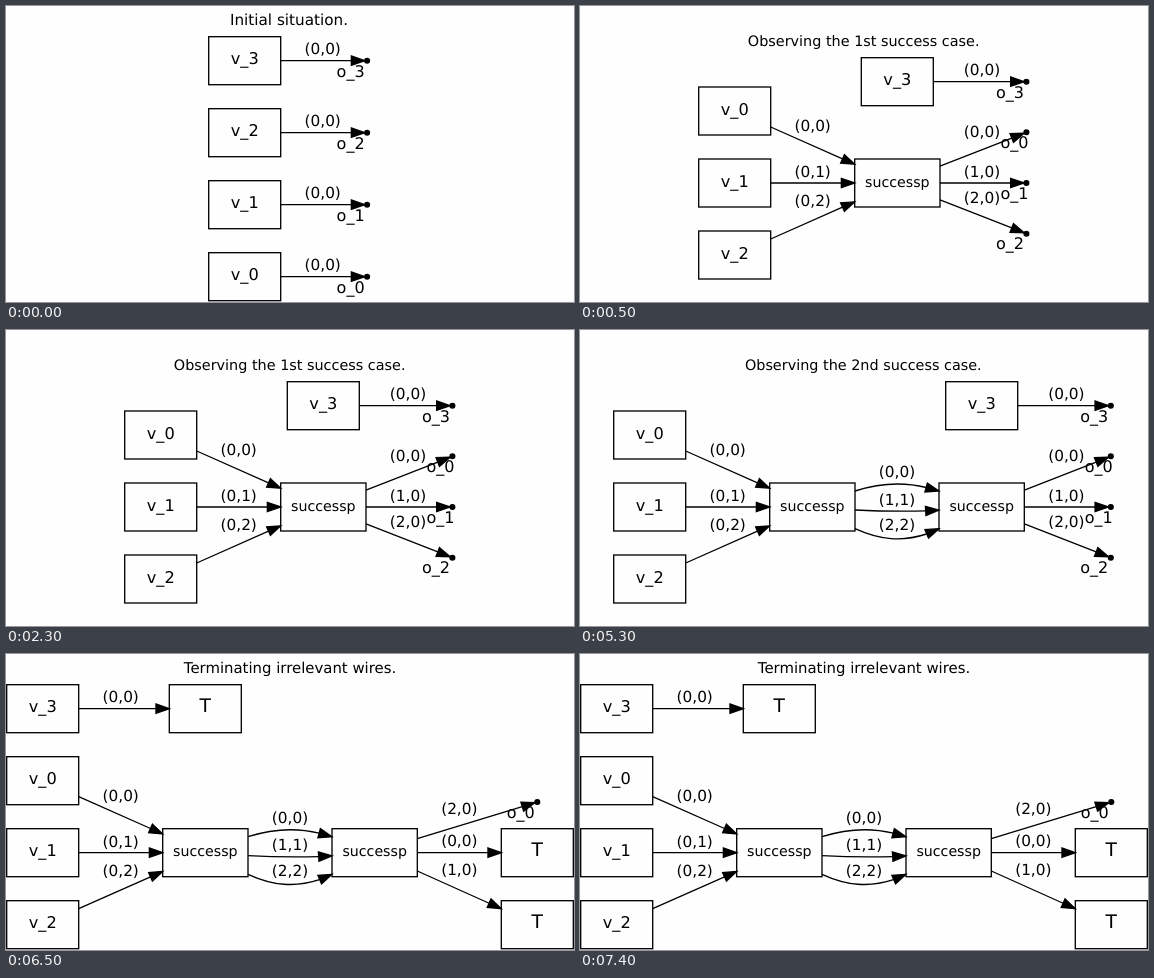
Animation of 568 by 296 pixels, one loop 8 s. Source, as an HTML page with a canvas:

```html
<!DOCTYPE html>
<html lang="en">
<head>
<meta charset="utf-8">
<style>
  html, body { margin: 0; width: 100%; height: 100%; overflow: hidden; background: #fefefe; }
  canvas { display: block; }
</style>
</head>
<body>
<canvas id="stage" width="568" height="296"></canvas>
<script>
const ctx = document.getElementById('stage').getContext('2d');
const BOX_W = 72, BOX_H = 48, PROC_W = 85.3, HEAD = 13.33;
const SIZE = { node: 16.2, process: 14.2, end: 18.67, wire: 15.3, output: 16 };

function text(str, x, y, size) {
  ctx.font = `${size}px "DejaVu Sans", sans-serif`;
  ctx.fillText(str, x, y);
}

function box(label, x, y, w = BOX_W, size = SIZE.node) {
  ctx.strokeRect(x, y, w, BOX_H);
  text(label, x + w / 2, y + 27.7, size);
}

const process = (x, y) => box('successp', x, y, PROC_W, SIZE.process);
const end = (x, y) => box('T', x, y, BOX_W, SIZE.end);
const wireLabel = (str, x, y) => text(str, x, y, SIZE.wire);

function head(x, y, angle) {
  ctx.save();
  ctx.translate(x, y);
  ctx.rotate(angle);
  ctx.beginPath();
  ctx.moveTo(0, 0);
  ctx.lineTo(-HEAD, -4.67);
  ctx.lineTo(-HEAD, 4.67);
  ctx.closePath();
  ctx.fill();
  ctx.stroke();
  ctx.restore();
}

function arrow(x1, y1, x2, y2) {
  const angle = Math.atan2(y2 - y1, x2 - x1);
  ctx.beginPath();
  ctx.moveTo(x1, y1);
  ctx.lineTo(x2 - HEAD * Math.cos(angle), y2 - HEAD * Math.sin(angle));
  ctx.stroke();
  head(x2, y2, angle);
}

function curve(x, y, c1, c2, base, tip) {
  ctx.beginPath();
  ctx.moveTo(x, y);
  ctx.bezierCurveTo(...c1, ...c2, ...base);
  ctx.stroke();
  head(...tip, Math.atan2(tip[1] - base[1], tip[0] - base[0]));
}

// Wire ending in a dot, with the output name placed relative to the dot.
function output(name, x1, y1, x2, y2, dx, dy) {
  const angle = Math.atan2(y2 - y1, x2 - x1);
  arrow(x1, y1, x2 - 2.4 * Math.cos(angle), y2 - 2.4 * Math.sin(angle));
  ctx.beginPath();
  ctx.arc(x2, y2, 2.4, 0, Math.PI * 2);
  ctx.fill();
  ctx.stroke();
  text(name, x2 + dx, y2 + dy, SIZE.output);
}

function at(x, y, draw) {
  ctx.save();
  ctx.translate(x, y);
  draw();
  ctx.restore();
}

function freeWire(i, x, y, length) {
  box('v_' + i, x, y);
  output('o_' + i, x + BOX_W, y + 24, x + BOX_W + length, y + 24, -16.5, 15.8);
}

// Three inputs feeding the first process; origin at the top input.
function inputs() {
  for (let i = 0; i < 3; i++) box('v_' + i, 0, i * 72);
  arrow(72, 40, 156, 77.2);
  arrow(72, 96, 156, 96);
  arrow(72, 152, 156, 114.8);
  wireLabel('(0,0)', 114, 44);
  wireLabel('(0,1)', 114, 90);
  wireLabel('(0,2)', 114, 119);
  process(156, 72);
}

// Second process with its three links; origin at the first one's top right.
function secondProcess() {
  curve(0, 8, [25, 0], [47, -1.5], [71.2, 4.5], [84, 8]);
  curve(0, 27, [24, 28.2], [46, 28.5], [71.2, 27.9], [84, 27.1]);
  curve(0, 45.6, [25, 57], [47, 59], [71.5, 51], [84, 45.7]);
  wireLabel('(0,0)', 42, -6);
  wireLabel('(1,1)', 42, 21.7);
  wireLabel('(2,2)', 42, 46.8);
  process(84, 0);
}

// Open outputs; origin at the last process's top right.
function openOutputs() {
  output('o_0', 0, 7.2, 86.4, -26.7, -12, 15.5);
  output('o_1', 0, 24, 86.4, 24, -12, 15.8);
  output('o_2', 0, 40.8, 86.4, 74.7, -16.5, 15.5);
  wireLabel('(0,0)', 42, -22.5);
  wireLabel('(1,0)', 42, 17.8);
  wireLabel('(2,0)', 42, 44);
}

function initial() {
  text('Initial situation.', 283, 19, 15.24);
  for (let i = 0; i < 4; i++) {
    const y = 246.7 - i * 72;
    freeWire(i, 202.7, y, 86.4);
    wireLabel('(0,0)', 316.7, y + 17.5);
  }
}

function firstCase() {
  text('Observing the 1st success case.', 283.7, 40, 14.4);
  freeWire(3, 281.3, 51.7, 93.1);
  wireLabel('(0,0)', 402, 69.2);
  at(118.7, 81, inputs);
  at(360, 153, openOutputs);
}

function secondCase() {
  text('Observing the 2nd success case.', 283.3, 40, 14.4);
  freeWire(3, 365.7, 51.7, 93.1);
  wireLabel('(0,0)', 486.4, 69.2);
  at(33.7, 81, inputs);
  at(275, 153, secondProcess);
  at(444.4, 153, openOutputs);
}

function termination() {
  text('Terminating irrelevant wires.', 284, 19, 14.9);
  box('v_3', 0.7, 30.7);
  arrow(72.7, 54.7, 163.3, 54.7);
  wireLabel('(0,0)', 114.7, 48.2);
  end(163.3, 30.7);
  at(0.7, 102.7, inputs);
  at(242, 174.7, secondProcess);
  output('o_0', 411.3, 184.7, 531.3, 148, -16.5, 15.5);
  arrow(411.3, 198.7, 495.3, 198.7);
  arrow(411.3, 217, 495.3, 254.7);
  wireLabel('(2,0)', 453.3, 160.2);
  wireLabel('(0,0)', 453.3, 192.2);
  wireLabel('(1,0)', 453.3, 221.2);
  end(495.3, 174.7);
  end(495.3, 246.7);
}

const LOOP = 8000;
const scenes = [[500, initial], [3500, firstCase], [6500, secondCase], [LOOP, termination]];

function render() {
  const time = performance.now() % LOOP;
  ctx.fillStyle = '#fefefe';
  ctx.fillRect(0, 0, 568, 296);
  ctx.fillStyle = ctx.strokeStyle = '#000';
  ctx.lineWidth = 1.33;
  ctx.textAlign = 'center';
  ctx.textRendering = 'geometricPrecision';
  scenes.find(([until]) => time < until)[1]();
  requestAnimationFrame(render);
}
render();
</script>
</body>
</html>
```
